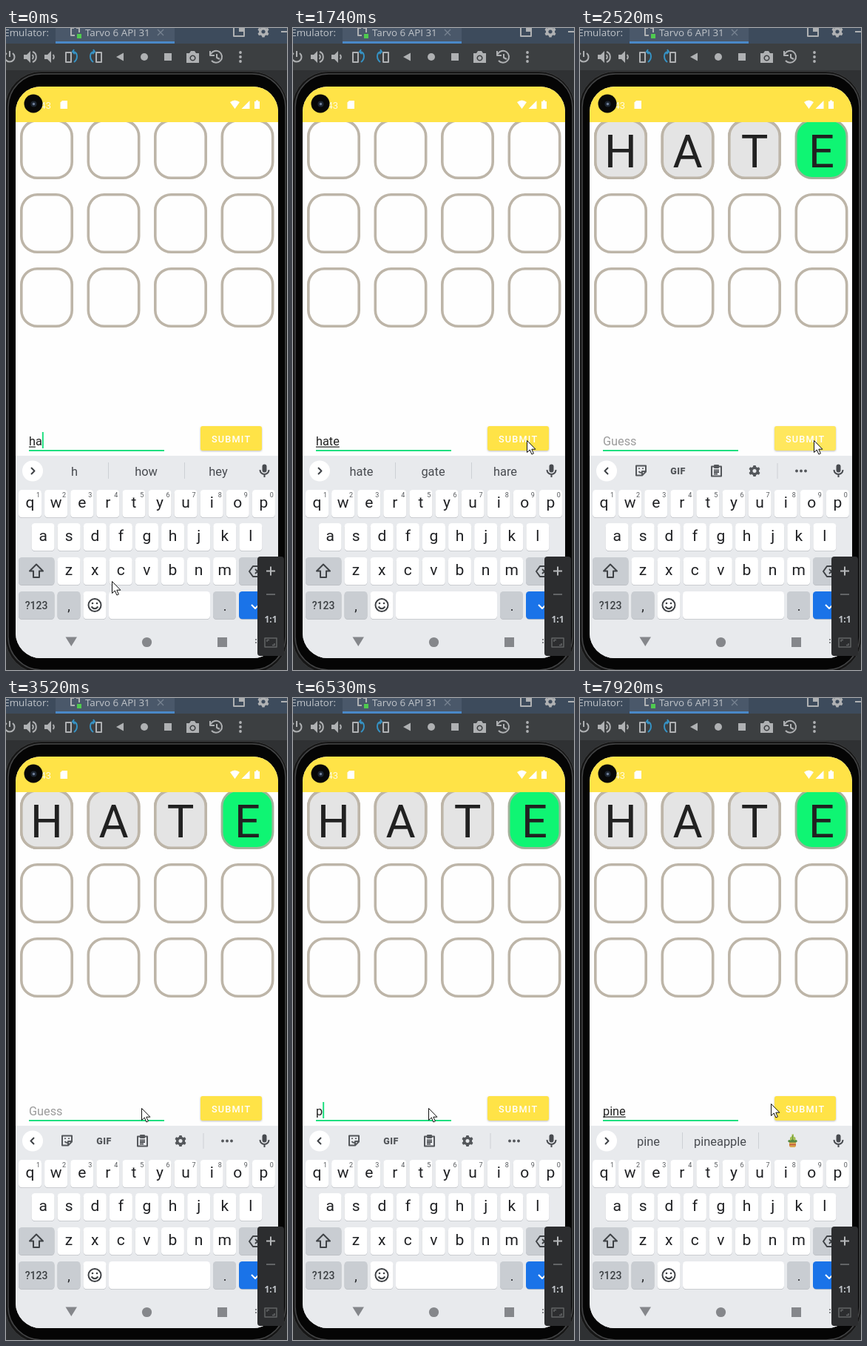
An HTML page for the animation above (8 s loop, 380x866 px).

```html
<!DOCTYPE html>
<html lang="en">
<head>
<meta charset="utf-8">
<title>Word guess on an emulator</title>
<style>
  html, body { margin: 0; width: 100%; height: 100%; overflow: hidden; background: #2f3133; }
  svg { display: block; width: 380px; height: 866px; font-family: Roboto, sans-serif; }
  .ui { font-family: "Open Sans", "Noto Sans", sans-serif; fill: #c1c5ca; }
  .mid { text-anchor: middle; }
  .line { fill: none; stroke-width: 2; stroke-linejoin: round; }
</style>
</head>
<body>
<svg id="stage" viewBox="0 0 380 866" xmlns="http://www.w3.org/2000/svg">
  <defs>
    <clipPath id="screen"><rect x="13" y="79" width="355" height="771" rx="34"/></clipPath>
    <clipPath id="board"><rect x="13" y="127" width="355" height="400"/></clipPath>
    <clipPath id="buttonShape"><rect x="263" y="537" width="83" height="33" rx="3"/></clipPath>
    <radialGradient id="glow">
      <stop offset="0" stop-color="#fff"/><stop offset=".7" stop-color="#fff" stop-opacity=".75"/>
      <stop offset="1" stop-color="#fff" stop-opacity="0"/>
    </radialGradient>
    <path id="gear" d="M-1.6-7.5h3.2l.5 2 1.8 1 2-.7 1.6 2.8-1.5 1.4v2l1.5 1.4-1.6 2.8-2-.7-1.8 1-.5 2h-3.2l-.5-2-1.8-1-2 .7-1.6-2.8 1.500-1.4v-2l-1.500-1.4 1.6-2.8 2 .7 1.8-1zM0-2.6a2.6 2.6 0 1 0 .01 0z" fill-rule="evenodd"/>
    <path id="speaker" d="M-8-3h4l5-5v16l-5-5h-4z"/>
  </defs>

  <!-- window chrome -->
  <rect width="380" height="22" fill="#3d4b5c"/>
  <rect x="67" width="161" height="22" fill="#4a586a"/>
  <rect y="21" width="380" height="36" fill="#3c3f41"/>
  <rect x="67" y="18" width="161" height="3" fill="#4a88c7"/>
  <g class="ui" font-size="13.400">
    <text x="58" y="11" text-anchor="end">Emulator:</text>
    <text x="107" y="11">Tarvo 6 API 31</text>
  </g>
  <g class="line" stroke="#afb1b3">
    <path d="M92 0h-4v10h5M95 0h4v6"/>
    <path d="M205 2l8 8m0-8l-8 8" stroke="#778391" stroke-width="1.300"/>
    <path d="M308-2h14v13h-14z"/><path d="M372 5h8"/>
  </g>
  <rect x="96" y="8" width="6" height="6" fill="#4fcb4f"/>
  <rect x="315" y="0" width="6" height="5" fill="#afb1b3"/>
  <use href="#gear" x="348" y="5" fill="#afb1b3"/>
  <g fill="#afb1b3">
    <use href="#speaker" x="32" y="39"/><use href="#speaker" x="60" y="39"/>
    <path d="M159 33.500v11l-10-5.500z"/><circle cx="187" cy="39" r="5"/><rect x="214" y="34" width="10" height="10"/>
    <path d="M244 34h4l2-3h5l2 3h4v13h-17zM252.500 36.500a4 4 0 1 0 .01 0z" fill-rule="evenodd"/><circle cx="252.500" cy="40.500" r="2.500"/>
    <circle cx="317" cy="33" r="1.900"/><circle cx="317" cy="39" r="1.900"/><circle cx="317" cy="45" r="1.900"/>
  </g>
  <g class="line" stroke="#afb1b3">
    <path d="M5 31v8M9 34a6.500 6.500 0 1 1-8 0"/>
    <path d="M35.500 36a4 4 0 0 1 0 6M36 32a7.500 7.500 0 0 1 0 14M63.500 36a4 4 0 0 1 0 6"/>
    <path d="M81 33h7v13h-7zM122 33h7v13h-7z"/>
    <path d="M277 35a8 8 0 1 1 1 9M276 31v6h6M285 35v5l4 2"/>
    <path d="M91 32q5 1 5 6t-4 8M92 29l-2 3 3 3M119 32q-5 1-5 6t4 8M118 29l2 3-3 3" stroke="#3592c4"/>
  </g>

  <!-- phone -->
  <rect x="-1" y="58.500" width="382" height="812" rx="49" fill="#161616" stroke="#3a3b3c"/>
  <rect x="3" y="62" width="375" height="804" rx="45" fill="#050505" stroke="#444546" stroke-width="1.500"/>
  <g clip-path="url(#screen)">
    <rect x="13" y="79" width="355" height="771" fill="#fefefe"/>
    <rect x="13" y="79" width="355" height="48" fill="#ffe347"/>
    <g fill="#fff">
      <text x="61" y="109" font-size="13" text-anchor="end" opacity=".85">6:43</text>
      <path d="M76 98h7v11h-9.500v-8.500z"/>
      <path d="M303 100q6.500-5 13 0l-6.500 9zM329.500 98v11h-11zM336 99h2v-1.500h3v1.500h2v10h-7z"/>
    </g>
    <circle cx="37" cy="102" r="12.500" fill="#080808"/>
    <circle cx="37.500" cy="102.500" r="4" fill="#1d2531"/><circle cx="37.500" cy="102.500" r="1.700" fill="#71809b"/>
    <g id="tiles" clip-path="url(#board)"></g>

    <text id="hint" x="31" y="563" font-size="16.300" fill="#9b9b9b">Guess</text>
    <text id="entry" x="31" y="563" font-size="16.300" fill="#212121"></text>
    <rect id="composing" x="31" y="564.500" width="0" height="1.200" fill="#212121"/>
    <rect x="31" y="569" width="183" height="2" fill="#1fdf80"/>
    <rect id="caret" y="545" width="2" height="22" fill="#1fdf80"/>

    <rect id="button" x="263" y="537" width="83" height="33" rx="3" fill="#ffe347"/>
    <g clip-path="url(#buttonShape)"><circle id="ripple" cx="316" cy="556" fill="url(#glow)"/><rect id="fade" x="263" y="537" width="83" height="33" fill="#fff"/></g>
    <text x="278" y="558.700" font-size="12.700" font-weight="500" letter-spacing="1.200" fill="#fff">SUBMIT</text>

    <rect x="13" y="577" width="355" height="273" fill="#e8eaed"/>
    <circle cx="36" cy="597.500" r="14" fill="#fff"/>
    <path id="chevron" class="line" stroke="#3f4246" stroke-width="1.800"/>
    <g id="words" class="mid" font-size="16.400" fill="#484b50">
      <path d="M138.500 586v22M241.500 586v22" stroke="#cdd0d4"/>
      <text x="92.500" y="603.500"></text><text x="189.500" y="603.500"></text><text x="287" y="603.500"></text>
    </g>
    <g id="pine">
      <path d="M284 598v-5l2.500-2v-2.500h2.500v3l2.500 1.500v5z" fill="#a3bf55"/>
      <path d="M287.500 590v8" stroke="#6c9540"/>
      <path d="M281 598q1.500-3.500 3.500-1 3-3 6 0 2-2.500 3.500 1l-2.500 2h-8z" fill="#568a42"/>
      <path d="M283 599.500h9v5l-1.500 1.500h-6l-1.500-1.500z" fill="#d9a64f"/>
      <path d="M283 602.500h9" stroke="#c2553c" stroke-width="1.500"/>
    </g>
    <g id="tools" fill="#54575b">
      <g class="line" stroke="#54575b" stroke-width="1.700">
        <path d="M76 590.500h13v8l-5 5h-8zM89 598h-5v5M79.500 598q2 3 5 1M80 593.500v1.500M85 593.500v1.500"/>
        <path d="M178 591.500h13v13h-13zM182 590h5v3h-5zM181 596.500h7M181 599h7M181 601.500h5"/>
        <path d="M267 587v21" stroke="#cdd0d4" stroke-width="1"/>
      </g>
      <text class="mid" x="132.500" y="601.500" font-size="12.500" font-weight="900" letter-spacing=".5">GIF</text>
      <use href="#gear" x="236" y="597.500"/>
      <circle cx="293" cy="597.500" r="1.900"/><circle cx="299" cy="597.500" r="1.900"/><circle cx="305" cy="597.500" r="1.900"/>
    </g>
    <rect x="346.500" y="588.500" width="6" height="11" rx="3" fill="#484b50"/>
    <path class="line" d="M343.500 596a6 6 0 0 0 12 0M349.500 602v4" stroke="#484b50" stroke-width="1.700"/>

    <g id="keys"></g>
    <g class="line" stroke="#3f4246" stroke-width="1.600">
      <path d="M41 723.500l9 9h-5v8.500h-8v-8.500h-5z"/>
      <path d="M329 733l5-7h14v14h-14zM337 730l6 6m0-6l-6 6"/>
      <circle cx="120" cy="778.500" r="8.500"/><path d="M115.500 780.500q4.500 5.500 9 0"/>
    </g>
    <circle cx="117" cy="776" r="1.300" fill="#3f4246"/><circle cx="123" cy="776" r="1.300" fill="#3f4246"/>
    <path class="line" d="M332 778l5 5 9-9" stroke="#fff"/>
    <g fill="#85878b">
      <path d="M80.500 821.500h15.500l-7.700 12.500z"/><circle cx="190.500" cy="828.500" r="6.600"/><rect x="286" y="822" width="13" height="13"/>
      <rect x="337" y="824" width="2" height="2"/><rect x="337" y="828" width="2" height="2"/>
    </g>
  </g>

  <!-- zoom panel -->
  <rect x="340" y="713" width="36" height="134" rx="4" fill="#2c2d2f"/>
  <g class="line" stroke="#b6b8ba">
    <path d="M352 732.500h12M358 726.500v12"/>
    <g stroke="#626466"><path d="M352 764h12"/><path d="M350 823h16v12h-16zM353 828v-2.500h3M363 830v2.500h-3" stroke-width="1.500"/></g>
  </g>
  <text class="ui mid" x="358" y="801.500" font-size="12" font-weight="700">1:1</text>

  <path id="mouse" d="M.5.5v16l3.800-3.500 2.600 6 2.500-1.100-2.600-5.700h5.100z" fill="#fff" stroke="#111" stroke-linejoin="round"/>
</svg>
<script>
const LOOP = 8000;
const $ = id => document.getElementById(id);

function add(parent, tag, attrs, text) {
  const node = document.createElementNS('http://www.w3.org/2000/svg', tag);
  set(node, attrs);
  if (text) node.textContent = text;
  parent.appendChild(node);
  return node;
}
function set(node, attrs) {
  for (const name in attrs) node.setAttribute(name, attrs[name]);
}
const show = (node, on) => node.setAttribute('visibility', on ? 'visible' : 'hidden');

const BORDER = { stroke: '#bdb5a8', 'stroke-width': 3.6 };
const MISS = { fill: '#e4e4e4', ...BORDER };
const HIT = { fill: '#0ff573', stroke: '#9bb599', 'stroke-width': 2.4 };
const blank = add($('tiles'), 'g', { fill: '#fefefe', ...BORDER });
const answer = add($('tiles'), 'g', {});
for (let row = 0; row < 3; row++) {
  for (let col = 0; col < 4; col++) {
    const x = 19 + col * 90.5, y = 123 + row * 100;
    const box = { x: x + 1.8, y: y + 1.8, width: 68.4, height: 77.4, rx: 21.5 };
    add(blank, 'rect', box);
    if (row === 0) {
      add(answer, 'rect', { ...box, ...(col === 3 ? HIT : MISS) });
      add(answer, 'text', { x: x + 36, y: 187.5, class: 'mid', 'font-size': 61.5, fill: '#212121' }, 'HATE'[col]);
    }
  }
}

function key(x, y, width, fill = '#fff') {
  add($('keys'), 'rect', { x, y: y + 1, width, height: 37, rx: 4.5, fill: '#b9bcc1' });
  add($('keys'), 'rect', { x, y, width, height: 37.2, rx: 4.5, fill });
}
function label(x, y, size, text, more) {
  add($('keys'), 'text', { x, y, class: 'mid', 'font-size': size, fill: '#202124', ...more }, text);
}
[['qwertyuiop', 17], ['asdfghjkl', 34.6], ['zxcvbnm', 69.5]].forEach(([letters, left], row) => {
  const y = Math.round(622.8 + row * 45.6);
  [...letters].forEach((letter, i) => {
    const x = left + i * 35.1;
    key(x, y, 31);
    label(x + 15.5, y + 24, 21, letter);
    if (row === 0) label(x + 26.5, y + 10, 9, (i + 1) % 10 + '', { fill: '#55585c' });
  });
});
const GREY = '#c9cdd2';
key(17, 714, 48.5, GREY);
key(315, 714, 49, GREY);
key(17, 760, 48.5, GREY);
key(69.5, 760, 31, GREY);
key(104.5, 760, 31);
key(139, 760, 137);
key(280, 760, 31, GREY);
key(315, 760, 49, '#1a73e8');
label(41, 784, 14, '?123', { 'font-weight': 500, fill: '#3c4043' });
label(85, 786, 18, ',');
label(296, 786, 18, '.');

// Each cue changes only the listed parts; words: null shows the toolbar.
const cues = [
  [0, { text: 'ha', under: 1, words: 'h how hey', caret: 1, mouse: [143, 746], guessed: 0, ripple: [0, 0], fade: 0, lift: 1 }],
  [120, { under: 2, words: 'ha have happy' }],
  [490, { text: 'hat' }],
  [640, { under: 3, words: 'hat that hatching' }],
  [890, { text: 'hate' }],
  [1010, { under: 4, words: 'hate gate hare' }],
  [1380, { caret: 0, mouse: [167, 726] }],
  [1500, { mouse: [236, 652] }],
  [1620, { mouse: [299, 578] }],
  [1740, { mouse: [316, 556] }],
  [1990, { text: '', under: 0, caret: 1, guessed: 1, ripple: [30, .22], lift: 3 }],
  [2110, { words: null, ripple: [60, .2] }],
  [2370, { ripple: [64, .2] }],
  [2520, { caret: 0, ripple: [0, 0], fade: .12, lift: 1 }],
  [2670, { fade: 0, mouse: [310, 556] }],
  [2790, { mouse: [284, 555] }],
  [2910, { mouse: [247, 554] }],
  [3030, { caret: 1, mouse: [211, 554] }],
  [3150, { mouse: [190, 553] }],
  [3270, { mouse: [183, 553] }],
  [3520, { caret: 0 }],
  [4020, { caret: 1 }],
  [4520, { caret: 0 }],
  [4950, { caret: 1 }],
  [5480, { caret: 0 }],
  [5980, { caret: 1 }],
  [6410, { caret: 0 }],
  [6530, { text: 'p', caret: 1 }],
  [6780, { text: 'pi', under: 1, words: 'p play put' }],
  [6900, { under: 2, words: 'pi pick pink' }],
  [7040, { text: 'pin' }],
  [7160, { text: 'pine', under: 3, words: 'pin pink pinned' }],
  [7280, { under: 4, words: 'pine pineapple' }],
  [7650, { caret: 0, mouse: [241, 552] }],
  [7800, { mouse: [253, 549] }],
  [7920, { mouse: [258, 547] }]
];

function render(time) {
  const s = Object.assign({}, ...cues.filter(([at]) => at <= time).map(([, change]) => change));
  const entry = $('entry');
  entry.textContent = s.text;
  set($('composing'), { width: s.under ? entry.getSubStringLength(0, s.under) : 0 });
  set($('caret'), { x: 31 + (s.text ? entry.getComputedTextLength() : 0) });
  show($('caret'), s.caret);
  show($('hint'), !s.text);
  show(answer, s.guessed);

  show($('words'), s.words);
  show($('tools'), !s.words);
  const words = (s.words || '').split(' ');
  $('words').querySelectorAll('text').forEach((node, i) => { node.textContent = words[i] || ''; });
  show($('pine'), s.words && words.length === 2);
  set($('chevron'), { d: s.words ? 'M34 593l4.5 4.5-4.5 4.5' : 'M38 593l-4.5 4.5 4.5 4.5' });

  set($('ripple'), { r: s.ripple[0], opacity: s.ripple[1] });
  set($('fade'), { opacity: s.fade });
  $('button').style.filter = `drop-shadow(0 ${s.lift}px ${s.lift}px rgba(0,0,0,.25))`;
  set($('mouse'), { transform: `translate(${s.mouse})` });
}

const start = performance.now();
function tick() {
  render((performance.now() - start) % LOOP);
  requestAnimationFrame(tick);
}
tick();
</script>
</body>
</html>
```
